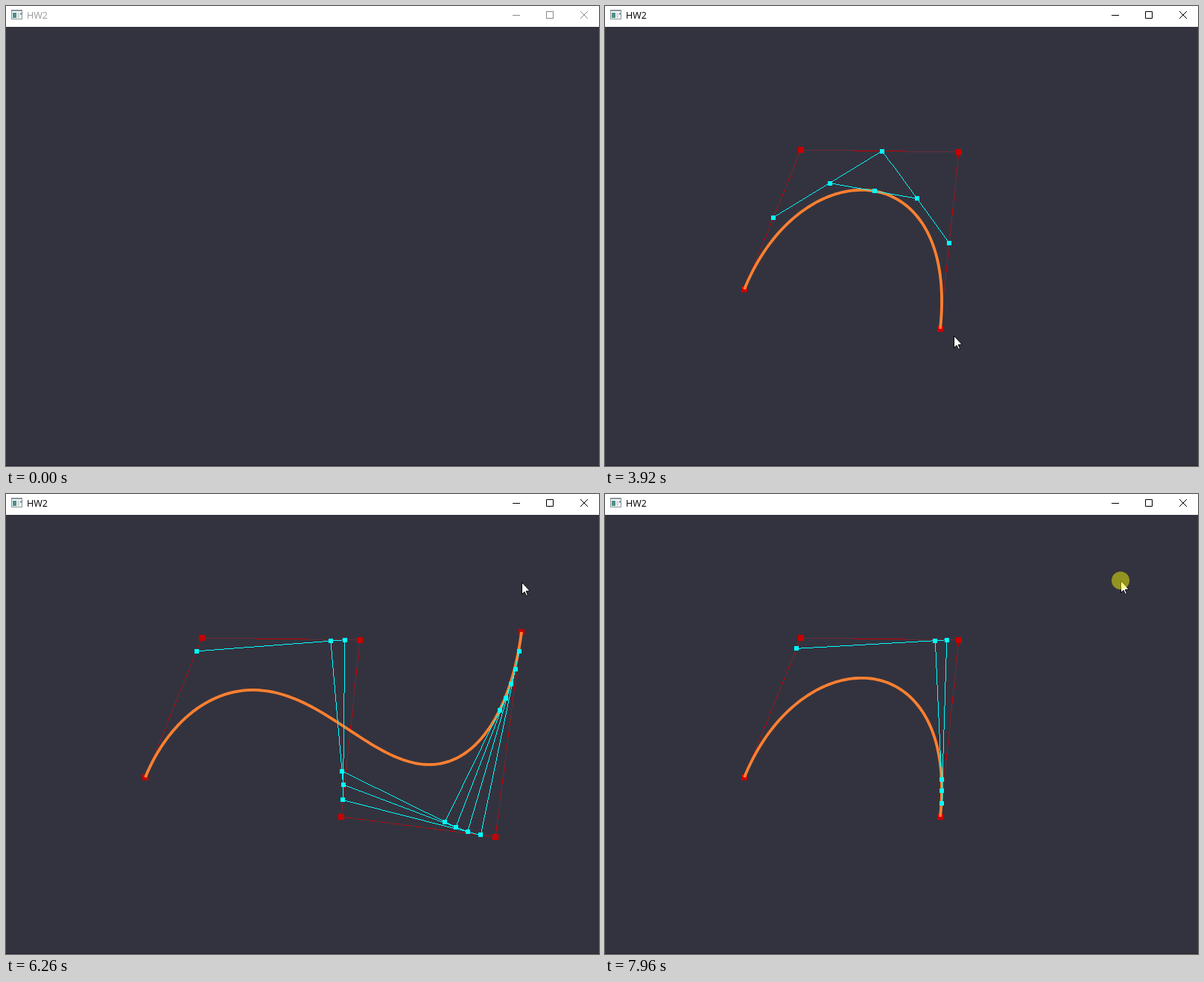
An HTML page with a canvas that plays this animation: 796x617 px, repeating every 8000 ms.

```html
<!DOCTYPE html>
<html lang="en">
<head>
<meta charset="utf-8">
<title>HW2</title>
<style>
  html, body { margin: 0; width: 100%; height: 100%; overflow: hidden; background: #33333f; }
  canvas { display: block; }
</style>
</head>
<body>
<canvas id="stage" width="796" height="617"></canvas>
<script>
const ctx = document.getElementById('stage').getContext('2d');
const LOOP = 8000, TICK = 77.3, TICK_START = 1522;
const CURVE_START = 1388, CURVE_SPEED = .000599;
const REST = 280, PRESS = 155;
const RED = '#c80000', DIM_RED = '#6a2c34', CYAN = '#00ffff', ORANGE = '#ff8030';

// Each click adds a point; bow bends the pointer's way there sideways
const points = [
  { x: 187, y: 380, at: 430, bow: 0 },
  { x: 263, y: 193, at: 1515, bow: 0 },
  { x: 475, y: 196, at: 2370, bow: -18 },
  { x: 450, y: 433, at: 3500, bow: -60 },
  { x: 657, y: 460, at: 4490, bow: 25 },
  { x: 692, y: 185, at: 5460, bow: 32 }
];
const removals = [7470, 7770];
const stops = [
  { x: 321, y: 364, at: 0 },
  ...points,
  { x: 692, y: 116, at: 6300, bow: 0 }
];

const mix = (a, b, u) => a.map((v, i) => v + (b[i] - v) * u);
const ease = u => (1 - Math.cos(Math.PI * u)) / 2;
const clamp = u => Math.min(1, Math.max(0, u));

function pointerAt(time) {
  const next = stops.findIndex(stop => stop.at > time);
  if (next < 0) return stops[stops.length - 1];
  const a = stops[next - 1], b = stops[next];
  const leave = a.at + REST;
  const u = ease(clamp((time - leave) / (b.at - leave)));
  const dx = b.x - a.x, dy = b.y - a.y;
  const side = b.bow * Math.sin(Math.PI * u) / Math.hypot(dx, dy);
  return { x: a.x + dx * u - dy * side, y: a.y + dy * u + dx * side };
}

function rect(color, x, y, w, h) {
  ctx.fillStyle = color;
  ctx.fillRect(x, y, w, h);
}

function square([x, y], size, color) {
  rect(color, Math.round(x) - size / 2, Math.round(y) - size / 2, size, size);
}

// One-pixel line without smoothing; odd rows or columns may take a second colour
function line(a, b, color, oddColor = color) {
  const dx = Math.abs(b[0] - a[0]), dy = Math.abs(b[1] - a[1]);
  const count = Math.max(1, Math.round(Math.max(dx, dy)));
  for (let i = 0; i < count; i++) {
    const [x, y] = mix(a, b, (i + .5) / count).map(Math.floor);
    rect((dx > dy ? y : x) % 2 ? oddColor : color, x, y, 1, 1);
  }
}

function nextLevel(level, u) {
  return level.slice(1).map((p, i) => mix(level[i], p, u));
}

function strokePath(path, color, width) {
  ctx.beginPath();
  path.forEach(([x, y]) => ctx.lineTo(x, y));
  ctx.strokeStyle = color;
  ctx.lineWidth = width;
  ctx.stroke();
}

function drawCurve(control) {
  const path = [];
  for (let i = 0; i <= 100; i++) {
    let level = control;
    while (level.length > 1) level = nextLevel(level, i / 100);
    path.push(level[0]);
  }
  ctx.lineJoin = 'round';
  strokePath(path, ORANGE, 3.8);
}

function drawConstruction(control, u) {
  let level = nextLevel(control, u);
  while (level.length) {
    level.slice(1).forEach((p, i) => line(level[i], p, CYAN));
    level.forEach(p => square(p, 6, CYAN));
    level = nextLevel(level, u);
  }
}

function drawTitleBar(active) {
  const ink = active ? '#000' : '#8a8a8a';
  rect('#fff', 0, 0, 796, 28);
  rect('#8b959c', 7, 5, 15, 13);
  rect('#f4f6f7', 8, 7, 13, 10);
  rect('#4b8f8c', 9, 9, 5, 7);
  rect('#d5dadd', 15, 9, 3, 7);
  rect('#8aa0b8', 19, 9, 2, 3);
  ctx.font = '12.5px "Open Sans", "Noto Sans", sans-serif';
  ctx.fillStyle = active ? '#000' : '#999';
  ctx.fillText('HW2', 28, 17);
  rect(ink, 680, 12, 10, 1);
  ctx.strokeStyle = ink;
  ctx.lineWidth = 1;
  ctx.strokeRect(725.5, 7.5, 9, 9);
  strokePath([[771, 7], [781, 17]], ink, 1);
  strokePath([[781, 7], [771, 17]], ink, 1);
}

function drawPointer({ x, y }, pressed) {
  const arrow = [[.5, .5], [.5, 16.5], [4, 13.2], [6.5, 18.5], [8.5, 17.6], [6.2, 12.3], [11.3, 12]];
  ctx.save();
  ctx.translate(Math.round(x), Math.round(y));
  ctx.beginPath();
  arrow.forEach(([px, py]) => ctx.lineTo(px, py));
  ctx.closePath();
  ctx.fillStyle = '#fff';
  ctx.fill();
  ctx.strokeStyle = '#000';
  ctx.lineWidth = 1;
  ctx.lineJoin = 'miter';
  ctx.stroke();
  if (pressed) {
    ctx.beginPath();
    ctx.arc(0, 0, 12, 0, Math.PI * 2);
    ctx.fillStyle = 'rgba(255,255,0,.47)';
    ctx.fill();
  }
  ctx.restore();
}

function draw(time) {
  rect('#33333f', 0, 28, 796, 589);
  rect('#262630', 0, 616, 796, 1);
  drawTitleBar(time >= REST);

  const removed = removals.filter(at => time >= at).length;
  const control = points
    .slice(0, points.length - removed)
    .filter(p => time >= p.at)
    .map(p => [p.x, p.y]);
  control.slice(1).forEach((p, i) => line(control[i], p, RED, DIM_RED));
  control.forEach(p => square(p, 8, RED));
  if (control.length > 1) {
    drawCurve(control);
    drawConstruction(control, (time - CURVE_START) * CURVE_SPEED % 1);
  }

  if (time > 50) {
    const clicks = [...points.map(p => p.at), ...removals];
    const pressed = clicks.some(at => time >= at && time < at + PRESS);
    drawPointer(pointerAt(time), pressed || time >= removals[1]);
  }
}

const start = performance.now();

function frame() {
  const time = (performance.now() - start) % LOOP;
  draw(TICK_START + Math.floor((time - TICK_START) / TICK) * TICK);
  requestAnimationFrame(frame);
}
frame();
</script>
</body>
</html>
```
